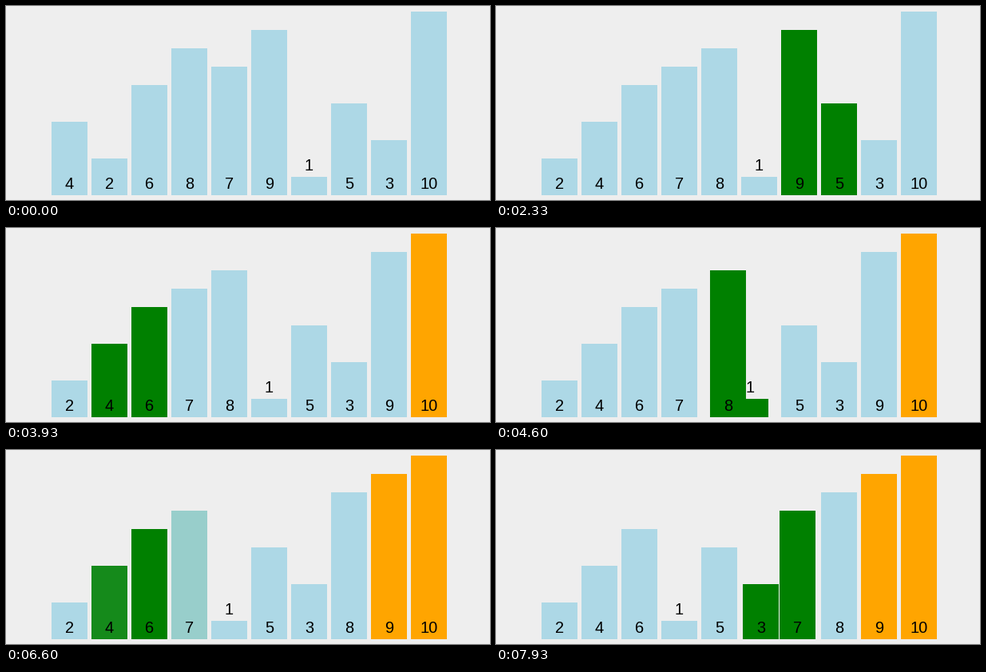
Recreate the animation shown at these times as a matplotlib script. Size 606 px wide and 243 px high, loop 8 s.

```python
import numpy as np
import matplotlib.pyplot as plt
from matplotlib.animation import FuncAnimation
from matplotlib.colors import to_rgb
from matplotlib.patches import Rectangle

W, H, DPI = 606, 243, 100
LEFT, PITCH, BAR, UNIT, BASE = 57, 50, 45, 23, 237
PLAIN, ACTIVE, DONE = (np.array(to_rgb(c)) for c in ("lightblue", "green", "orange"))
START = [4, 2, 6, 8, 7, 9, 1, 5, 3, 10]

# Clock of the sort: milliseconds against steps completed
CLOCK_MS = [324, 1400, 3200, 4600, 5800, 6600, 7933]
CLOCK_STEP = [0, 5.38, 14.32, 21.38, 27.39, 31.31, 37.785]


def bubble_states(values):
    """Positions and colours, by value, after each step of a bubble sort."""
    order, done, states = list(values), set(), []

    def push(pair=()):
        pos = {v: LEFT + PITCH * i for i, v in enumerate(order)}
        col = {v: DONE if v in done else ACTIVE if v in pair else PLAIN
               for v in order}
        states.append((pos, col))

    for last in range(len(order) - 1, 0, -1):
        push()
        for i in range(last):
            pair = order[i], order[i + 1]
            push(pair)
            if pair[0] > pair[1]:
                order[i], order[i + 1] = pair[1], pair[0]
                push(pair)
        done.add(order[last])
        push()
    return states


def ease(x):
    return 4 * x ** 3 if x < 0.5 else 1 - 4 * (1 - x) ** 3


def mix(a, b, f):
    return a + (b - a) * f


STATES = bubble_states(START)

plt.rcParams["font.family"] = "Liberation Sans"
fig = plt.figure(figsize=(W / DPI, H / DPI), dpi=DPI, facecolor="#eeeeee")
ax = fig.add_axes([0, 0, 1, 1])
ax.set_xlim(0, W)
ax.set_ylim(H, 0)
ax.axis("off")

bars, labels = {}, {}
for v in START:
    bars[v] = ax.add_patch(Rectangle((0, BASE - UNIT * v), BAR, UNIT * v,
                                     linewidth=0, snap=False))
    base = BASE - 8 - (UNIT if v == 1 else 0)
    labels[v] = ax.text(0, base, str(v), fontsize=20 * 72 / DPI, color="black",
                        ha="center", va="baseline", zorder=3)


def draw(i):
    # Motion advances 15 times a second
    tick = min((3 * i + 3) // 10, 119)
    step = np.interp(tick * 200 / 3, CLOCK_MS, CLOCK_STEP)
    k = int(step)
    f = ease(step - k)
    (pos0, col0), (pos1, col1) = STATES[k], STATES[k + 1]
    for v in START:
        x = mix(pos0[v], pos1[v], f)
        bars[v].set_x(x)
        bars[v].set_facecolor(mix(col0[v], col1[v], f))
        labels[v].set_x(x + BAR / 2)
    return [*bars.values(), *labels.values()]


anim = FuncAnimation(fig, draw, frames=400, interval=20, repeat=True,
                     repeat_delay=0, blit=False)
plt.show()
```
